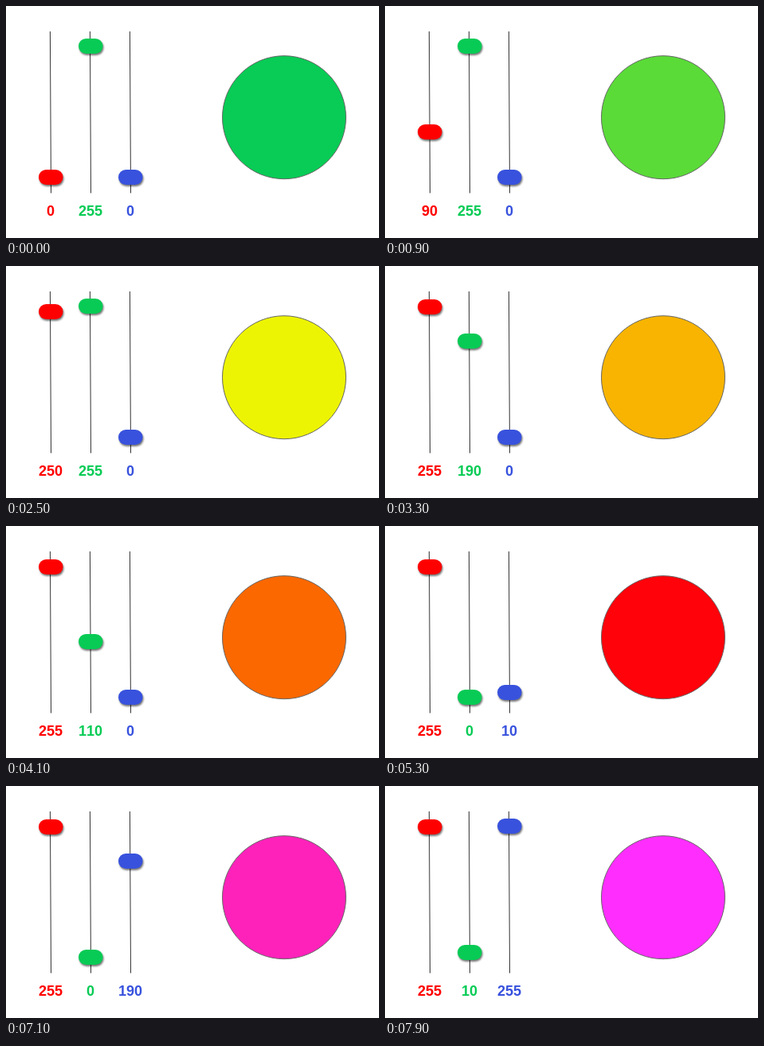
Recreate the animation shown at these times as an HTML page. Size 468 px wide and 292 px high, loop 8000 ms.

```html
<!DOCTYPE html>
<html lang="en">
<head>
<meta charset="utf-8">
<title>RGB mixer</title>
<style>
html, body { margin: 0; width: 100%; height: 100%; overflow: hidden; background: #fff; }
svg { display: block; width: 468px; height: 292px; }
text { font: bold 18px "Liberation Sans", Arial, sans-serif; font-kerning: none; text-anchor: middle; }
.knob { filter: drop-shadow(1px 2px 1.3px rgba(0, 0, 0, .55)); }
</style>
</head>
<body>
<svg id="stage" viewBox="0 0 468 292">
  <circle id="mix" cx="349" cy="140.2" r="77.5" stroke="#666"/>
</svg>
<script>
const STEP = 100, LOOP = 8000, TOP = 26;
const stage = document.getElementById('stage');
const mix = document.getElementById('mix');

function add(tag, attrs) {
  const el = document.createElementNS('http://www.w3.org/2000/svg', tag);
  for (const k in attrs) el.setAttribute(k, attrs[k]);
  return stage.appendChild(el);
}

function slider(x, fill, travel) {
  add('line', { x1: x - .6, y1: 32, x2: x + .5, y2: 235.5, stroke: '#333' });
  const knob = add('rect', { class: 'knob', x: x - 15, width: 30.5, height: 19, rx: 9.3, fill });
  const label = add('text', { x, y: 264, fill });
  return level => {
    knob.setAttribute('y', Math.round(206 - travel * level / TOP));
    label.textContent = Math.min(255, level * 10);
  };
}

const setRed = slider(56, '#f00', 164);
const setGreen = slider(106, '#07cb55', 165);
const setBlue = slider(156, '#3852dd', 165);

// Each slider runs its full travel between two neighbouring hues
const green = [8, 204, 85], yellow = [246, 246, 0], red = [255, 0, 0], magenta = [255, 46, 255];
const hues = [green, yellow, red, magenta, magenta];

function hueAt(n) {
  const i = Math.floor(n / TOP), k = n % TOP / TOP;
  return `rgb(${hues[i].map((a, c) => Math.round(a + (hues[i + 1][c] - a) * k))})`;
}

const clamp = v => Math.max(0, Math.min(TOP, v));

function draw(now) {
  const n = Math.floor(now % LOOP / STEP);
  setRed(clamp(n));
  setGreen(clamp(Math.max(2 * TOP - n, n - 3 * TOP)));
  setBlue(clamp(n - 2 * TOP));
  mix.setAttribute('fill', hueAt(n));
}

const start = performance.now();
function frame() {
  draw(performance.now() - start);
  requestAnimationFrame(frame);
}
frame();
</script>
</body>
</html>
```
